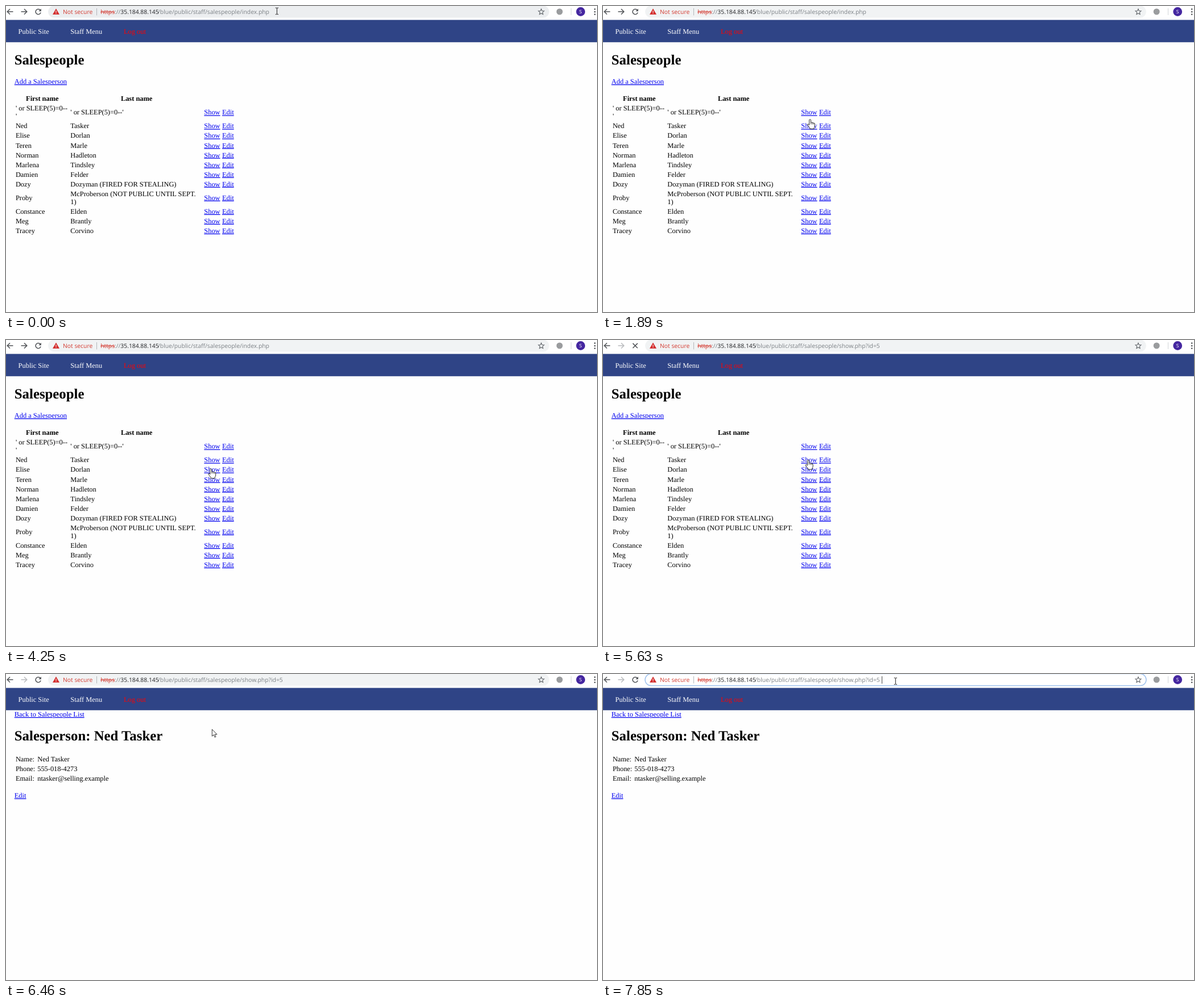
Animation of 1039 by 539 pixels, one loop 8000 ms. Source, as an HTML page:

```html
<!DOCTYPE html>
<html lang="en">
<head>
<meta charset="utf-8">
<title>Salespeople</title>
<style>
  html, body { margin: 0; width: 100%; height: 100%; overflow: hidden; background: #fefefe; }
  svg { display: block; }
  text { font: 12.4px "Liberation Serif", serif; text-rendering: geometricPrecision; }
  .bold { font-weight: bold; }
  .title { font-size: 24.8px; font-weight: bold; }
  .link { fill: #00e; text-decoration: underline; }
  .ui { font: 10.35px "Open Sans", sans-serif; }
  .mid { text-anchor: middle; }
  .icon { fill: none; stroke: #505357; stroke-width: 1.5; }
</style>
</head>
<body>
<svg width="1039" height="539" viewBox="0 0 1039 539">
  <rect width="1039" height="24" fill="#fff"/>
  <rect y="24" width="1039" height="1" fill="#dfe2ea"/>
  <rect y="24.6" width="1039" height="39.2" fill="#2f4486"/>
  <rect id="pill" x="74" y="-.4" width="881" height="21" rx="10.5" stroke-width="1.5"/>

  <path class="icon" d="M12.5 10H2.5M7 5.2L2.2 10L7 14.8"/>
  <path class="icon" id="forward" d="M26.5 10H36.5M32 5.2L36.8 10L32 14.8"/>
  <g class="icon" id="reload">
    <path d="M60.3 7.3A4.6 4.6 0 1 0 61.1 11.4"/>
    <path d="M61.9 4.8V9.3H57.4Z" fill="#505357" stroke="none"/>
  </g>
  <path class="icon" id="stop" d="M52.4 5.9L60.8 14.3M60.8 5.9L52.4 14.3"/>

  <path d="M88 4.6L94 15H82Z" fill="#d32f2f"/>
  <path d="M88 8.2V11.5M88 12.3V13.5" stroke="#fff" stroke-width="1.1"/>
  <path d="M159.5 4V16.5" stroke="#b4b7bb"/>
  <path d="M941 5.2L942.4 8.5L946 8.8L943.3 11.2L944.1 14.7L941 12.9L937.9 14.7L938.7 11.2L936 8.8L939.6 8.5Z"
        fill="none" stroke="#5f6368" stroke-width="1.1"/>
  <circle cx="973.2" cy="10" r="5.5" fill="#9a9c9e"/>
  <path d="M993.5 4V16" stroke="#d4d6d9"/>
  <circle cx="1010.2" cy="10" r="7.9" fill="#4527a0"/>
  <text class="ui mid" x="1010.2" y="13" fill="#fff" style="font-size:8.5px">S</text>
  <g fill="#505357">
    <circle cx="1035.2" cy="5.6" r="1.3"/><circle cx="1035.2" cy="10.2" r="1.3"/><circle cx="1035.2" cy="14.8" r="1.3"/>
  </g>

  <g id="bar"></g>
  <text class="ui" id="path" x="267" y="14" fill="#7b8085"></text>
  <path id="caret" d="M490.5 4V17" stroke="#333" stroke-width=".9"/>
  <g id="list"></g>
  <g id="detail"></g>

  <g id="arrow" fill="#fff" stroke="#111" stroke-width=".85">
    <path d="M.3 .5V12.6L3.1 10L5 14.4L6.9 13.6L5.1 9.3H8.9Z"/>
  </g>
  <g id="hand" fill="#fff" stroke="#111" stroke-width=".9" stroke-linejoin="round">
    <path d="M-1.4 1.6Q0 -.6 1.4 1.6V6.4Q2.7 5.2 3.9 6.8Q5.2 5.8 6.2 7.3Q8.2 6.6 8.4 9V12Q8.2 14 7 15.5V17.5H-.3V15.8L-4.4 10.7Q-5 8.8 -3.2 9L-1.4 10.5Z"/>
    <path d="M1.4 6.4V9.4M3.9 6.8V9.6M6.2 7.3V9.8" fill="none" stroke-width=".7"/>
  </g>
  <path id="beam" d="M-2.6 -5.7H-.7L0 -5.1L.7 -5.7H2.6M0 -5.1V5.1M-2.6 5.7H-.7L0 5.1L.7 5.7H2.6" fill="none" stroke="#111" stroke-width=".95"/>
</svg>
<script>
const LOOP = 8000;
const ROW = 17.05, LINE = 13.95;
const $ = id => document.getElementById(id);
const text = (x, y, str, cls = '', attrs = '') =>
  `<text x="${x}" y="${y}" class="${cls}" ${attrs}>${str}</text>`;

$('bar').innerHTML = [
  text(100, 14, 'Not secure', 'ui', 'fill="#d3392f"'),
  text(166.2, 14, 'https', 'ui', 'fill="#d3392f" text-decoration="line-through"'),
  text(191, 14, '://', 'ui', 'fill="#7b8085"'),
  text(201.3, 14, '35.184.88.145', 'ui', 'fill="#202124"'),
  text(21.6, 49, 'Public Site', '', 'fill="#fff"'),
  text(113.3, 49, 'Staff Menu', '', 'fill="#fff"'),
  text(207, 49, 'Log out', '', 'fill="#f00"')
].join('');

// A cell may hold several lines, split by "|".
const people = [
  ["' or SLEEP(5)=0--|'", "' or SLEEP(5)=0--'"],
  ['Ned', 'Tasker'],
  ['Elise', 'Dorlan'],
  ['Teren', 'Marle'],
  ['Norman', 'Hadleton'],
  ['Marlena', 'Tindsley'],
  ['Damien', 'Felder'],
  ['Dozy', 'Dozyman (FIRED FOR STEALING)'],
  ['Proby', 'McProberson (NOT PUBLIC UNTIL SEPT.|1)'],
  ['Constance', 'Elden'],
  ['Meg', 'Brantly'],
  ['Tracey', 'Corvino']
];

function buildList() {
  let out = text(14.8, 102.9, 'Salespeople', 'title')
    + text(14.8, 137, 'Add a Salesperson', 'link')
    + text(63.8, 167.4, 'First name', 'bold mid')
    + text(229.6, 167.4, 'Last name', 'bold mid');
  let y = 184.4;
  for (const person of people) {
    const cells = person.map(cell => cell.split('|'));
    const extra = (Math.max(...cells.map(c => c.length)) - 1) * LINE;
    cells.forEach((lines, col) => {
      const top = y + (extra - (lines.length - 1) * LINE) / 2;
      lines.forEach((line, i) => out += text(col ? 113.3 : 16.9, top + i * LINE, line));
    });
    out += text(348.3, y + extra / 2, 'Show', 'link') + text(380, y + extra / 2, 'Edit', 'link');
    y += ROW + extra;
  }
  return out;
}

function buildDetail() {
  const fields = [['Name:', 'Ned Tasker'], ['Phone:', '555-018-4273'], ['Email:', 'ntasker@selling.example']];
  return text(14.8, 75, 'Back to Salespeople List', 'link')
    + text(14.8, 117, 'Salesperson: Ned Tasker', 'title')
    + fields.map(([label, value], i) =>
        text(16.9, 153.5 + i * ROW, label) + text(55.2, 153.5 + i * ROW, value)).join('')
    + text(14.8, 218, 'Edit', 'link');
}

$('list').innerHTML = buildList();
$('detail').innerHTML = buildDetail();

// Pointer: [from ms, shape, x, y], held until the next step.
const pointer = [
  [0, 'beam', 476.3, 9],
  [590, 'arrow', 436, 78], [740, 'arrow', 364, 205], [890, 'arrow', 343.2, 229],
  [1040, 'hand', 354, 226], [1190, 'hand', 356, 226],
  [1590, 'hand', 358, 223], [1725, 'hand', 361, 213], [1860, 'hand', 364, 199], [1995, 'hand', 364, 190],
  [2130, 'hand', 362, 196], [2265, 'hand', 359, 206], [2400, 'hand', 357, 211],
  [2680, 'hand', 357, 225], [2830, 'hand', 358.7, 238], [2990, 'hand', 357, 240], [3130, 'hand', 356.5, 241],
  [3550, 'hand', 355.5, 242],
  [4110, 'hand', 358, 235], [4250, 'hand', 360.3, 226], [4370, 'hand', 360, 220],
  [4500, 'hand', 360.3, 217], [4640, 'hand', 360.5, 215.5],
  [5070, 'hand', 360.7, 210.5],
  [5790, 'arrow', 360.5, 211],
  [6190, 'arrow', 351, 176], [6320, 'arrow', 347, 132], [6460, 'arrow', 362, 97], [6610, 'arrow', 388, 80],
  [6750, 'arrow', 428, 68], [6890, 'arrow', 466, 61], [7020, 'arrow', 490, 58], [7160, 'arrow', 500, 58],
  [7310, 'arrow', 510, 34], [7440, 'beam', 514.3, 12.6]
];

const show = (id, on) => { $(id).style.display = on ? '' : 'none'; };

function draw(t) {
  const [, shape, x, y] = pointer.findLast(step => step[0] <= t);
  for (const id of ['arrow', 'hand', 'beam']) show(id, id === shape);
  $(shape).setAttribute('transform', `translate(${x} ${y})`);

  const opened = t >= 5630, loaded = t >= 5790, focused = t >= 7730;
  const loading = t >= 5350 && !loaded;
  show('stop', loading);
  show('reload', !loading);
  show('list', !loaded);
  show('detail', loaded);
  show('caret', focused);
  $('forward').style.stroke = opened ? '#b9bbbe' : '#505357';
  $('path').textContent = '/blue/public/staff/salespeople/' + (opened ? 'show.php?id=5' : 'index.php');
  $('pill').setAttribute('fill', focused ? '#fff' : t < 590 ? '#eceef0' : '#f1f3f4');
  $('pill').setAttribute('stroke', focused ? '#9fc2ee' : 'none');
}

const start = performance.now();
function tick() {
  draw((performance.now() - start) % LOOP);
  requestAnimationFrame(tick);
}
tick();
</script>
</body>
</html>
```
